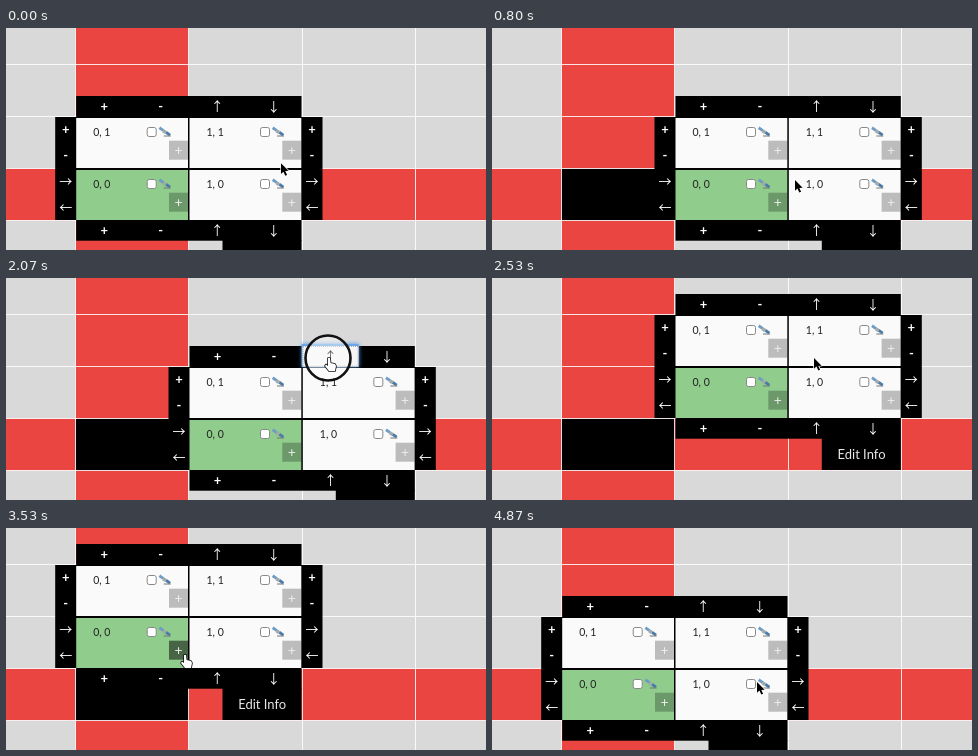
Recreate the animation shown at these times as an HTML page with a canvas. Size 480 by 222 pixels, loop 4990 ms.

```html
<!DOCTYPE html>
<html lang="en">
<head>
<meta charset="utf-8">
<title>Grid panel</title>
<style>
html, body { margin: 0; width: 100%; height: 100%; overflow: hidden; }
canvas { display: block; }
</style>
</head>
<body>
<canvas id="stage" width="480" height="222"></canvas>
<script>
const g = document.getElementById('stage').getContext('2d');
const LOOP = 4990, FIRST_CLICK = 670, GAP = 1320, HOLD = 130, LEAD = 770;
const RED = '#ea4540', GREEN = '#90cc8c', WHITE = '#fafafa';
const PITCH_X = 113.3, PITCH_Y = 52;
const SIGNS = ['+', '-', '↑', '↓'], SIDE_SIGNS = ['+', '-', '→', '←'];
// Where the cursor rests, and how far its way there bends
const STOPS = [
  { x: 273, y: 134 },
  { x: 303, y: 152, bend: 0 },
  { x: 322, y: 80, bend: 0.05 },
  { x: 178, y: 127, bend: 0.03 },
  { x: 265, y: 154, bend: 0.17 }
];

function rect(x, y, w, h, color) {
  g.fillStyle = color;
  g.fillRect(x, y, w, h);
}

function text(s, x, y, color, font, align = 'left') {
  g.fillStyle = color;
  g.font = font + ', sans-serif';
  g.textAlign = align;
  g.fillText(s, x, y);
}

function shape(points, fill, stroke) {
  g.beginPath();
  for (const [x, y] of points) g.lineTo(x, y);
  g.closePath();
  g.lineWidth = 1.6;
  g.lineJoin = 'round';
  g.strokeStyle = stroke;
  g.stroke();
  g.fillStyle = fill;
  g.fill();
}

const inside = (p, [x, y, w, h]) => p.x >= x && p.x < x + w && p.y >= y && p.y < y + h;

// The panel goes right, up, left and down, one cell per click
function panelAt(t) {
  const step = Math.floor((t - FIRST_CLICK - HOLD) / GAP + 1) % 4;
  const right = step === 1 || step === 2;
  return [70.2 + right * PITCH_X, 89 - (step > 1) * PITCH_Y];
}

function cursorAt(t) {
  const since = t - FIRST_CLICK + LEAD;
  const n = Math.floor(since / GAP);
  const a = STOPS[n], b = STOPS[n + 1];
  const p = Math.min(1, (since % GAP) / (LEAD - HOLD));
  const e = p * p * (3 - 2 * p);
  const bow = b.bend * Math.sin(Math.PI * e);
  const dx = b.x - a.x, dy = b.y - a.y;
  return { x: a.x + dx * e - dy * bow, y: a.y + dy * e + dx * bow };
}

function drawGrid() {
  rect(0, 0, 480, 222, '#d9d9d9');
  rect(69.5, 0, PITCH_X, 222, RED);
  rect(0, 140.5, 480, PITCH_Y, RED);
  rect(69.5, 140.5, PITCH_X, PITCH_Y, '#000');
  for (let i = 0; i < 4; i++) {
    rect(Math.round(69 + i * PITCH_X), 0, 1, 222, 'rgba(255,255,255,.85)');
    rect(0, 36 + i * PITCH_Y, 480, 1, 'rgba(255,255,255,.85)');
  }
}

function drawSatellite(x, y) {
  g.save();
  g.translate(x, y);
  g.rotate(0.6);
  rect(-6.5, -1.5, 5, 2.8, '#6f9cc4');
  rect(1.5, -1.5, 5, 2.8, '#4a7cab');
  rect(-1.5, -1.5, 3, 3.5, '#a3a8a6');
  g.restore();
  rect(x - 1, y + 4, 7, 1, '#777');
}

function drawCell(x, y, col, row, p) {
  const cx = x + col * PITCH_X, cy = y + row * PITCH_Y;
  const add = [cx + 92.8, cy + 23.7, 19, 19];
  const hot = inside(p, add);
  rect(cx, cy + 1, 111.8, 50, row && !col ? GREEN : WHITE);
  text(col + ', ' + (1 - row), cx + 17, cy + 19, '#222', '10.5px Lato');
  g.beginPath();
  g.roundRect(cx + 71, cy + 10.5, 9, 9, 2);
  g.fillStyle = '#fff';
  g.fill();
  g.lineWidth = 1;
  g.strokeStyle = '#888';
  g.stroke();
  drawSatellite(cx + 88.5, cy + 14.5);
  rect(...add, hot ? 'rgba(0,0,0,.5)' : 'rgba(0,0,0,.25)');
  text('+', cx + 102.3, cy + 38, '#eee', '14px Lato', 'center');
  return hot;
}

function drawButton(box, sign, hot, pressed) {
  const [x, y, w, h] = box;
  if (hot) {
    if (pressed) {
      g.save();
      g.shadowColor = '#4a94e6';
      g.shadowBlur = 4;
      rect(x - 1, y - 2, w + 1, h + 2, '#6ca6e4');
      g.restore();
    }
    rect(x, y, w, h, '#f5f5f5');
    g.strokeStyle = '#aaa';
    g.lineWidth = 1;
    g.setLineDash([1, 1]);
    g.strokeRect(x + .5, y + .5, w - 1, h - 1);
    g.setLineDash([]);
  }
  const font = '+-'.includes(sign) ? 'bold 13px Lato' : '13px "Noto Sans CJK JP", "Noto Sans CJK SC"';
  text(sign, x + w / 2, y + h / 2 + 4.5, hot ? '#000' : '#fff', font, 'center');
}

// Returns true when the cursor is over something clickable
function drawPanel(x, y, p, pressed) {
  rect(x, y - 21, 225.3, 144.7, '#000');
  rect(x - 21, y, 267.3, 103, '#000');
  rect(x + 146.3, y + 123, 79, 32, '#000');
  text('Edit Info', x + 162, y + 144, '#e8e8e8', '13px Lato');

  const buttons = [];
  for (let i = 0; i < 4; i++) {
    for (const by of [y - 21, y + 103]) buttons.push([[x + i * 56.5, by, 56, 20.7], SIGNS[i]]);
    for (const bx of [x - 21, x + 225.3]) buttons.push([[bx, y + i * 26, 21, 25.5], SIDE_SIGNS[i]]);
  }
  let over = false;
  for (const [box, sign] of buttons) {
    const hot = inside(p, box);
    drawButton(box, sign, hot, pressed);
    over = over || hot;
  }
  for (const col of [0, 1])
    for (const row of [0, 1]) over = drawCell(x, y, col, row, p) || over;
  return over;
}

function drawRing({ x, y }) {
  g.beginPath();
  g.arc(x, y, 22.5, 0, 7);
  g.fillStyle = 'rgba(255,255,255,.4)';
  g.fill();
  g.lineWidth = 2.6;
  g.strokeStyle = '#111';
  g.stroke();
}

function drawCursor({ x, y }, hand) {
  g.save();
  g.translate(x, y);
  if (hand) {
    shape([[0, 0], [2, 0], [2.6, 5], [7, 6], [8, 8], [7, 13], [1, 13], [-3, 8], [-2, 6.5], [0, 8]],
      '#fff', '#111');
  } else {
    g.scale(.9, .9);
    shape([[0, 0], [0, 12], [2.7, 9.5], [4.8, 14], [6.8, 13], [4.8, 8.8], [8.5, 8.5]], '#000', '#fff');
  }
  g.restore();
}

function draw(now) {
  // The picture ticks 15 times a second
  const tick = Math.floor((now % LOOP + 4) * 0.015);
  const t = Math.round(tick * 20 / 3) * 10;
  const p = cursorAt(t);
  const pressed = t >= FIRST_CLICK && (t - FIRST_CLICK) % GAP < HOLD;
  drawGrid();
  const hand = drawPanel(...panelAt(t), p, pressed);
  if (pressed) drawRing(p);
  drawCursor(p, hand);
}

const start = performance.now();
function loop() {
  draw(performance.now() - start);
  requestAnimationFrame(loop);
}
loop();
</script>
</body>
</html>
```
